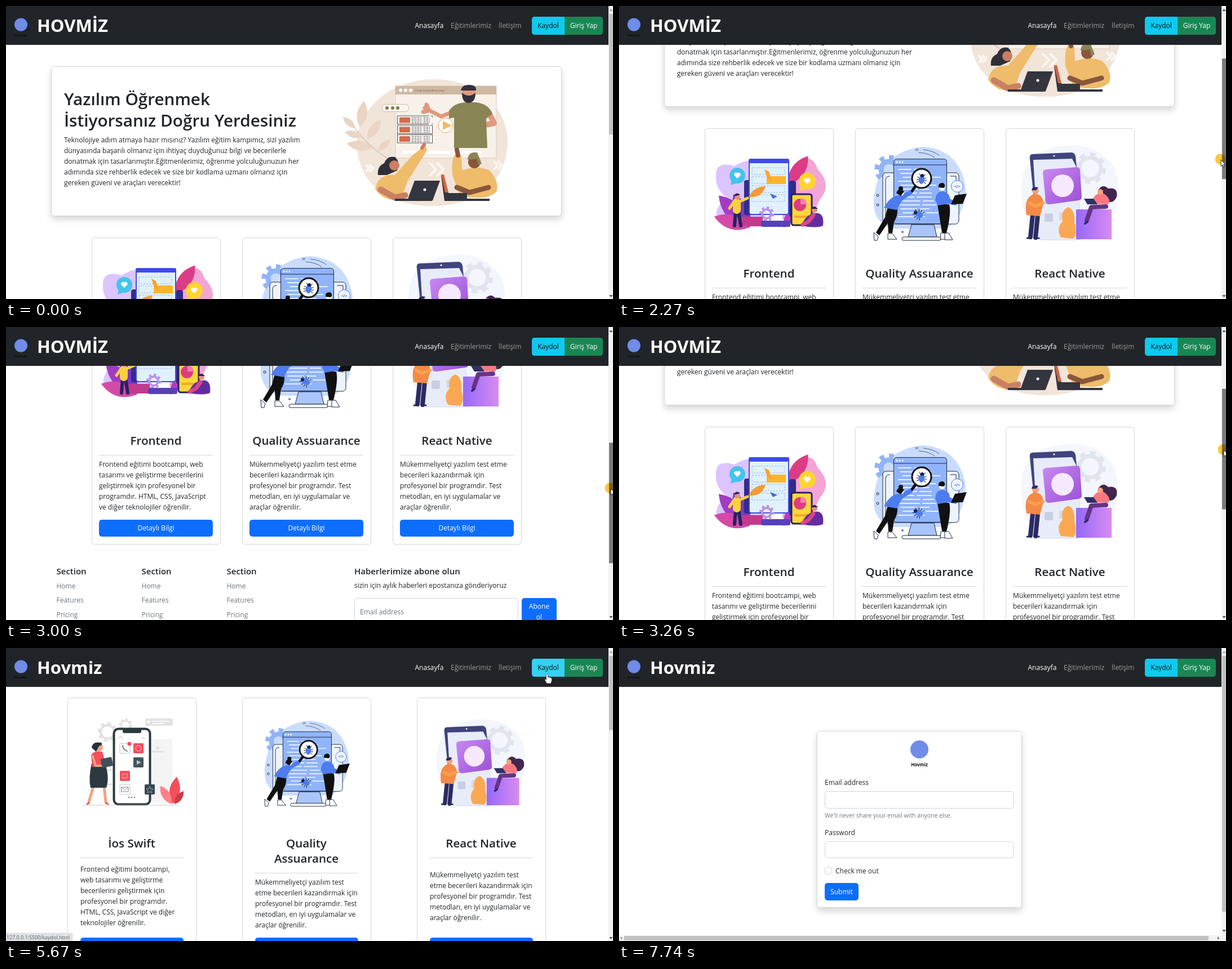
Write an HTML page that moves like this. It is 1077x520 px and loops after 8270 ms.

```html
<!DOCTYPE html>
<html lang="tr">
<head>
<meta charset="utf-8">
<title>Hovmiz</title>
<style>
html, body { margin: 0; width: 100%; height: 100%; overflow: hidden; background: #fff; }
svg { display: block; width: 1077px; height: 520px; font-family: "Open Sans", "Noto Sans", sans-serif; }
.card { fill: #fff; stroke: #d3d4d5; }
.shadow { filter: drop-shadow(0 6px 6px rgba(0, 0, 0, .16)); }
.input { fill: #fff; stroke: #ced4da; }
#halo { mix-blend-mode: multiply; }
</style>
</head>
<body>
<svg id="stage" viewBox="0 0 1077 520"></svg>
<script>
const INK = '#212529', BLUE = '#0d6efd', GREY = '#6c757d', MARK = '#6f8ce8';
const LOOP = 8270, STEP = 66.7;

// Drawing helpers
const rect = (x, y, w, h, fill, rx = 0, more = '') =>
  `<rect x="${x}" y="${y}" width="${w}" height="${h}" rx="${rx}" fill="${fill}" ${more}/>`;
const dot = (x, y, r, fill, more = '') => `<circle cx="${x}" cy="${y}" r="${r}" fill="${fill}" ${more}/>`;
const path = (d, fill, more = '') => `<path d="${d}" fill="${fill}" ${more}/>`;
const line = (d, stroke, width = 1, more = '') =>
  `<path d="${d}" fill="none" stroke="${stroke}" stroke-width="${width}" stroke-linecap="round" stroke-linejoin="round" ${more}/>`;
const text = (x, mid, str, size = 12, fill = INK, more = '') =>
  `<text x="${x}" y="${mid + size * .36}" font-size="${size}" fill="${fill}" ${more}>${str}</text>`;
const semi = 'font-weight="600"', bold = 'font-weight="700"', center = 'text-anchor="middle"';
const lines = (x, y, list) => list.map((s, i) => text(x, y + i * 19, s)).join('');
const leaf = (x, y, len, angle, fill) =>
  path(`M0 0Q${len / 2} ${-len * .38} ${len} 0Q${len / 2} ${len * .38} 0 0Z`, fill, `transform="translate(${x} ${y}) rotate(${angle})"`);
const gear = (x, y, r, color, w = 5) =>
  dot(x, y, r, 'none', `stroke="${color}" stroke-width="${w}"`) +
  dot(x, y, r + w * .8, 'none', `stroke="${color}" stroke-width="${w}" pathLength="16" stroke-dasharray="1"`);
const chevrons = (x, y, h) =>
  [0, h * .6].map(d => line(`M${x + d} ${y - h / 2}l${h / 2} ${h / 2}l${-h / 2} ${h / 2}`, '#fbf6f1', 4)).join('');
const heart = (x, y) => path(`M${x} ${y + 5}l-5 -5a3 3 0 0 1 5 -4a3 3 0 0 1 5 4Z`, '#fff');
const bug = (x, y, a) => `<g transform="translate(${x} ${y}) rotate(${a})">` +
  line('M-8 -4L8 6M-8 6L8 -4M-9 1H9M-3 -6l-2 -4M3 -6l2 -4', '#18223c') +
  `<ellipse rx="5" ry="8" fill="#4d7cf0"/>` + dot(0, -7, 3, '#18223c') + '</g>';

function heroArt() {
  const skin = '#e0997c', olive = '#8a8555', sun = '#eebc6a', dark = '#33353f', brown = '#8a563b';
  const row = y => rect(694.5, y, 62, 14.5, '#fff', 0, 'stroke="#57504c"') + rect(698, y + 2.5, 19, 10, '#d66a4c') +
    [3, 6, 9, 12].map(d => line(`M720 ${y + d}H737M741 ${y + d}H752`, '#8d8682', 1.4, 'stroke-dasharray="3 2"')).join('');
  return path('M624 262C612 190 680 128 762 130C842 132 892 184 890 244C888 310 836 357 752 355C680 353 634 320 624 262Z', '#f1e4d9') +
    line('M676 270Q636 244 615 210', '#dcc6b4', 1.5) +
    [[620, 217, 30, 222], [628, 216, 48, 279], [632, 232, 32, 196], [641, 236, 42, 305], [650, 252, 46, 190], [660, 257, 30, 318]]
      .map(l => leaf(...l, '#ead5c5')).join('') +
    rect(691, 142, 179, 128, '#f8f1ea', 0, 'stroke="#ddcbbb"') + rect(691, 142, 179, 15, '#cfb8a2') +
    [700, 709, 718].map(x => dot(x, 149.5, 3, '#fff')).join('') + text(725, 150, 'Örnek Online Bootcamp', 4.7, '#75695f') +
    rect(703, 257, 141, 5, '#fff') + rect(667, 174.5, 48, 13, '#fbf6f1', 6.5, 'stroke="#cfb8a2"') +
    [676, 686, 695].map(x => dot(x, 181, 3, '#857650')).join('') + [195, 212, 228.5].map(row).join('') +
    chevrons(752, 203, 14) + chevrons(752, 290, 22) + chevrons(639, 288, 11) + chevrons(866, 283, 13) +
    dot(780, 212, 13, '#fff', 'stroke="#e5ad61"') + path('M775 204L791 212L775 220Z', sun) +
    // presenter
    line('M795 187L772 196L743 181M752 185L740 188M750 183L746 175', skin, 7) + line('M856 188L866 208L830 215', skin, 10) +
    path('M786 186Q796 170 822 171Q854 169 863 191L852 200L854 252H795V198L786 200Z', olive) +
    dot(821, 156, 11.5, skin) + path('M809 154Q809 172 821 172Q833 171 833 154Q821 164 809 154Z', '#33303a') +
    path('M807 150Q809 139 822 140Q835 140 834 150Z', '#33303a') +
    // left learner
    path('M660 300Q658 285 671 279Q676 265 690 268Q700 276 694 292L676 300Z', '#302f38') + dot(689, 283, 9, '#c98063') +
    path('M655 325Q660 298 690 300L722 264L744 248L747 256L712 312L702 340Q675 352 655 325Z', sun) +
    line('M738 252l4 -6', '#c98063', 6) + line('M665 326L690 340L708 336', '#c98063', 11) +
    path('M725 310H770L757 345H712Z', dark) + rect(690, 342, 66, 4, dark) + dot(743, 326, 2.5, '#fff') +
    // right learner
    path('M792 300Q790 270 797 264L808 266L809 292Q835 282 858 292Q876 312 870 330Q850 348 805 335Z', sun) +
    line('M802 265L800 255', brown, 8) + dot(831, 277, 11, brown) + path('M819 273Q820 258 836 260L844 280L838 282L835 271Z', olive) +
    line('M856 322L822 331L800 322', brown, 9) + path('M772 301L777 301L785 332H818V346H778Z', dark) +
    path('M772 299L777 299L785 331L779 331Z', '#cf6649') + rect(780, 342, 78, 4, dark);
}

function frontendArt() {
  const navy = '#26225f';
  return path('M172 300Q172 276 205 285Q228 270 245 278L260 388H185Q158 372 190 340Q170 325 172 300Z', '#dcc5ff') +
    path('M298 300Q340 250 352 290Q380 318 356 345L340 380H290Z', '#f3a5d6') +
    leaf(300, 318, 62, -55, '#dc3c86') + leaf(228, 392, 75, 227, '#a13cc3') + leaf(232, 394, 66, 197, '#d44aa8') + leaf(232, 394, 66, 244, '#7a39c4') +
    leaf(292, 394, 40, 300, '#b33ec4') + rect(222, 310, 18, 62, '#332b88', 4) + rect(231, 273, 70, 98, '#e0f1fd', 4, 'stroke="#3f4ae8" stroke-width="2"') +
    rect(230, 272, 72, 8, '#3f4ae8', 3) + [288, 304, 320, 336].map(y => rect(236, y, 58, 12, 'none', 1, 'stroke="#9ab7df" stroke-dasharray="3 2"')).join('') +
    rect(262, 303, 34, 14, '#fbb52d') + path('M258 291l8 4l6 18l-9 -7Z', '#f7a427') + path('M230 340Q238 322 260 321Q254 342 230 340Z', '#f79a35') +
    line('M228 342L214 350', '#4836b8', 4) + path('M268 334l13 5l-8 4Z', '#4067e8') +
    dot(210, 302, 14, '#44c3ee') + path('M200 310l-2 9l12 -4Z', '#44c3ee') + heart(210, 302) +
    dot(334, 312, 15, '#ffd432') + path('M323 319l-2 10l13 -4Z', '#ffd432') + heart(334, 312) +
    rect(302, 311, 12, 64, '#332b88', 4) + rect(306, 335, 36, 55, '#ffd73b', 4, `stroke="${navy}" stroke-width="3"`) + dot(321, 354, 11, '#df3b83') +
    path('M322 353V342A11 11 0 0 1 333 353Z', '#f47eb0') + rect(311, 373, 24, 4, '#f6a531') + gear(262, 370, 8, '#b794e8', 4) +
    rect(216, 375, 39, 17, '#c33a8c', 2) + rect(252, 382, 52, 11, '#5840ba', 3) +
    line('M207 365L205 391M212 365L216 391', navy, 6) + line('M209 349V363', '#fad13d', 14) + line('M205 347L196 360M214 348L228 342', '#fad13d', 5) +
    dot(210, 340, 5, '#e98f78') + path('M204 339Q207 330 215 336Z', navy) +
    path('M324 391Q330 372 346 369Q365 365 362 391Q350 396 324 391Z', '#632d9e') + line('M345 372L337 383L326 389', '#d8458e', 7) + dot(347, 363, 5, '#e98f78') + path('M341 361Q346 353 353 361Z', navy);
}

function testArt() {
  const navy = '#1c2744', mid = '#4d7cf0';
  return path('M452 345Q460 258 540 251Q606 256 615 325Q612 380 580 396H485Q450 385 452 345Z', '#c9dcfd') + gear(479, 291, 14, '#92b4f7', 9) +
    line('M540 256Q558 258 568 266M532 261Q550 262 560 270M526 254l5 4m0 -4l-5 4', '#4d5f89') +
    rect(468, 297, 135, 91, '#eef4ff', 6, `stroke="${navy}"`) + line('M473 375V310Q473 303 480 303M598 310V303H588', navy) +
    rect(487.5, 272.5, 94, 115, '#90b4fb', 5, `stroke="${navy}"`) + line('M488 283H581', navy) + [493, 498, 503].map(x => dot(x, 278, 1.5, '#fff')).join('') +
    [0, 1, 2, 3, 4, 5, 6, 7, 8, 9, 10, 11, 12].map(i => line(`M${496 + i % 3 * 4} ${291 + i * 7}h${22 + i * 7 % 16}m6 0h${14 + i * 5 % 12}`, '#e5efff', 2)).join('') +
    line('M526 321L517 333', '#111', 5) + dot(537, 307, 17, '#fff', 'stroke="#111" stroke-width="3"') + bug(537, 309, 8) + bug(532, 371, -60) +
    dot(600, 321, 10.5, '#eef4ff', `stroke="${mid}"`) + text(600, 321, '&lt;/&gt;', 7, '#345bbb', `${semi} ${center}`) +
    path('M519 389H559L564 411H513Z', '#a9c5fb', `stroke="${navy}"`) + rect(502, 411, 69, 6, '#fff', 3, `stroke="${navy}"`) +
    dot(459, 337, 2, 'none', `stroke="${navy}"`) + dot(459, 354, 2, 'none', `stroke="${navy}"`) + dot(503, 402, 2, mid) +
    path('M477 357L494 360Q495 374 488 384L485 404H478L477 386L462 408L456 403L472 376Z', '#111') +
    path('M452 403l8 7l-2 7h-5Z', '#fff', `stroke="${navy}"`) + path('M477 405h8l8 10h-16Z', '#fff', `stroke="${navy}"`) +
    path('M470 359Q482 337 498 337L517 328L521 334L502 346L493 363Z', mid) + dot(501, 333, 4.5, '#fff') + path('M492 333Q496 321 506 330L500 338Z', '#111') + dot(500, 325, 4, '#111') +
    path('M565 353H586Q590 368 581 404H574L575 376L580 403H573Z', '#111') + path('M571 404h8v11h-9Z', '#fff', `stroke="${navy}"`) + path('M578 404h7l7 12h-14Z', '#fff', `stroke="${navy}"`) +
    path('M561 346Q562 331 573 330Q586 331 587 343L601 350L598 355L584 352L566 355Z', mid) + dot(573, 324, 5, '#fff') + path('M567 323Q566 314 575 315Q581 319 576 324Z', '#111') +
    path('M596 337L617 334L610 352L589 353Z', '#111');
}

function mobileArt() {
  const navy = '#2b2b62', peach = '#f2a07e';
  return path('M714 335Q710 262 780 250Q850 240 880 290Q896 350 862 402Q820 424 755 412Q716 390 714 335Z', '#f3f6fc') + gear(836, 289, 19, '#e0e4ec', 7) +
    path('M733 264L803 261Q809 262 810 268L821 408Q821 416 813 416H749Q742 414 741 407L729 272Q728 265 733 264Z', '#e8ecf9', 'stroke="#d5d9ea"') +
    path('M733 264L803 261Q809 262 810 268L812 288L804 272L735 274L743 408L729 272Q728 265 733 264Z', '#40447c') + dot(772, 267, 1.5, '#fff') +
    rect(755, 340, 13, 13, '#ccd2e4', 3) + rect(755, 369, 15, 15, '#c9cfe3', 3) + rect(781, 367, 15, 15, '#d6dbea', 3) +
    path('M758 291L812 287Q818 287 818 293L821 340Q821 345 815 346L764 353Q757 353 757 347L752 297Q752 292 758 291Z', 'url(#violet)') + dot(787, 320, 20, '#f6e9ff') +
    path('M784 412Q775 395 787 383Q783 364 797 358Q810 363 808 386Q814 406 806 414Z', '#fba852') +
    rect(811, 362, 63, 53, 'url(#box)') +
    line('M734 372L730 411M743 372L739 412', navy, 8) + path('M723 372Q717 340 738 334Q753 336 753 352L747 374Z', '#f48a45') + line('M728 351L738 356L752 351', '#f9a050', 6) +
    dot(739, 329, 6, peach) + path('M732 328Q733 320 744 323L740 328Z', navy) + line('M730 413h-6M739 413h6', navy, 3) +
    path('M850 328Q858 315 868 325Q886 322 883 340Q875 355 864 345Z', '#42264f') + path('M840 344Q850 328 862 335Q874 345 868 353L845 352Z', '#f9787e') + dot(854, 331, 5, peach) +
    line('M864 357L838 358L830 381', '#673387', 8) + path('M825 343h17l7 10h-18Z', '#303063') + line('M831 384l-4 3', navy, 4);
}

function phoneArt() {
  const dark = '#2b3941', red = '#f2505d', pale = '#e2e2e2';
  const icon = (x, y, fill, glyph) => rect(x - 9, y - 9, 18, 18, fill, 2, fill === '#fff' ? 'stroke="#c2c5c7"' : '') + glyph;
  return gear(180, 149, 12, pale, 4) + gear(212, 137, 8, pale, 3) + gear(262, 222, 9, pale, 4) +
    rect(247, 125, 49, 13, pale) + line('M260 130H290M260 134H280', '#fff', 1.5) + dot(253, 131, 2.5, '#fff') +
    rect(240, 162, 55, 112, '#f4f4f4') + dot(269, 177, 3, pale) + line('M260 184H279M164 217H187M168 242H187', pale, 3) +
    rect(191.5, 143.5, 64, 134, '#fff', 8, `stroke="${dark}" stroke-width="4"`) + rect(207, 143, 33, 8, dark, 3) +
    line('M199 160l4 -3l4 3M242 160h5', '#bbb') +
    icon(211, 178, '#fff', line('M207 173Q207 180 215 183', '#888', 2)) + dot(219, 170, 3.5, red) +
    icon(235, 178, red, dot(235, 178, 5, 'none', 'stroke="#ffb5b8"')) + icon(235, 203, '#45545c', path('M232 199L240 203L232 207Z', '#b8c3c8')) +
    icon(211, 227, red, rect(207, 223, 8, 8, 'none', 1, 'stroke="#ffb5b8"')) + icon(211, 251, '#fff', line('M205 247h12v8h-12ZL211 252L217 247', '#888')) +
    icon(255, 251, '#37474f', line('M255 246l2 4h4l-3 3l1 4l-4 -2l-4 2l1 -4l-3 -3h4Z', '#98a6ad')) + [218, 223, 228].map(x => dot(x, 265, 1, dark)).join('') +
    line('M155 246L147 273M174 246L177 273', '#f3a47f', 5) + path('M152 205H176Q184 230 178 248H150Q146 230 152 205Z', dark) +
    path('M151 190Q156 181 171 184L178 211H153Z', red) + line('M154 192L159 209L178 209', '#f3a47f', 4) + rect(169, 195, 20, 16, '#40515a', 2, 'transform="rotate(-12 179 203)"') +
    dot(165, 176, 7, '#f3a47f') + path('M152 177Q153 165 169 168Q173 172 165 174L160 184Z', '#263238') + line('M147 275l-3 2M177 275l4 2', red, 3) +
    leaf(296, 277, 49, -82, red) + leaf(299, 277, 28, -55, '#c93b49') + leaf(294, 277, 38, 238, '#ff8188') + line('M138 279H306', '#c7c9ca');
}

// Pages
const button = (x, y, w, h, label) => rect(x, y, w, h, BLUE, 5) + text(x + w / 2, y + h / 2, label, 12, '#fff', center);
const card = (x, y, w, h, more = '') => `<rect class="card ${more}" x="${x}" y="${y}" width="${w}" height="${h}" rx="5"/>`;
const input = (x, y, w, h, r = 5) => `<rect class="input" x="${x}" y="${y}" width="${w}" height="${h}" rx="${r}"/>`;
const art = (id, move) => `<use href="#${id}" transform="${move}"/>`;
const webText = ['Frontend eğitimi bootcampi, web', 'tasarımı ve geliştirme becerilerini', 'geliştirmek için profesyonel bir', 'programdır. HTML, CSS, JavaScript', 've diğer teknolojiler öğrenilir.'];
const testText = ['Mükemmeliyetçi yazılım test etme', 'becerileri kazandırmak için', 'profesyonel bir programdır. Test', 'metodları, en iyi uygulamalar ve', 'araçlar öğrenilir.'];
const shortTest = ['Mükemmeliyetçi yazılım test', 'etme becerileri kazandırmak için', ...testText.slice(2)];

const homeCard = (x, title, body, id) => card(x + .5, 411.5, 228, 441) + art(id, 'translate(0 193)') +
  text(x + 114, 669, title, 20.6, INK, `${semi} ${center}`) + rect(x + 13, 694, 202, 1, '#d6d7d8') + lines(x + 13, 711, body) + button(x + 13, 809, 202, 30, 'Detaylı Bilgi');

const home = card(80.5, 107.5, 905, 265, 'shadow') +
  text(103, 165, 'Yazılım Öğrenmek', 29.7, INK, semi) + text(103, 203, 'İstiyorsanız Doğru Yerdesiniz', 29.7, INK, semi) +
  lines(103, 237.5, ['Teknolojiye adım atmaya hazır mısınız? Yazılım eğitim kampımız, sizi yazılım', 'dünyasında başarılı olmanız için ihtiyaç duyduğunuz bilgi ve becerilerle',
    'donatmak için tasarlanmıştır.Eğitmenlerimiz, öğrenme yolculuğunuzun her', 'adımında size rehberlik edecek ve size bir kodlama uzmanı olmanız için', 'gereken güveni ve araçları verecektir!']) +
  heroArt() +
  homeCard(152, 'Frontend', webText, 'web') + homeCard(419, 'Quality Assuarance', testText, 'test') + homeCard(686, 'React Native', testText, 'mobile') +
  [89.5, 240.5, 391.5].map(x => text(x, 901, 'Section', 15, INK, semi) +
    ['Home', 'Features', 'Pricing', 'FAQs', 'About'].map((s, i) => text(x, 926.5 + i * 25.4, s, 12, GREY)).join('')).join('') +
  text(618, 901, 'Haberlerimize abone olun', 15, INK, semi) + text(618, 926, 'sizin için aylık haberleri epostanıza gönderiyoruz') +
  input(618.5, 948.5, 290, 48) + text(628, 973, 'Email address', 12, GREY) + rect(915, 948, 62, 49, BLUE, 5) +
  text(946, 963, 'Abone', 12, '#fff', center) + text(946, 982, 'ol', 12, '#fff', center) +
  rect(80, 1067, 906, 1, '#dee2e6') + text(89.5, 1096, '© 2023 Company, Inc. All rights reserved.');

const courseCard = (x, titles, y, body) => card(x + .5, 88.5, 228, 470) +
  titles.map((s, i) => text(x + 114, 347 + i * 27, s, 20.6, INK, `${semi} ${center}`)).join('') +
  rect(x + 23, 345 + titles.length * 27, 183, 1, '#d6d7d8') + lines(x + 23, y, body) + button(x + 23, 514, 183, 30, 'Detaylı Bilgi');

const courses = courseCard(109, ['İos Swift'], 393, ['Frontend eğitimi bootcampi,', 'web tasarımı ve geliştirme', 'becerilerini geliştirmek için', 'profesyonel bir programdır.', 'HTML, CSS, JavaScript ve diğer', 'teknolojiler öğrenilir.']) +
  courseCard(419, ['Quality', 'Assuarance'], 415.5, shortTest) + courseCard(729, ['React Native'], 402.5, shortTest) +
  phoneArt() + art('test', 'translate(44.8 -101) scale(.916)') + art('mobile', 'translate(110 -101) scale(.916)');

const signup = card(351.5, 147.5, 363, 313, 'shadow') + dot(533, 180, 16, MARK) + text(533, 207, 'Hovmiz', 8, '#111', `${bold} ${center}`) +
  text(365, 239, 'Email address') + input(365.5, 254.5, 335, 30) + text(365, 297, 'We\'ll never share your email with anyone else.', 10.5, GREY) +
  text(365, 327.5, 'Password') + input(365.5, 343.5, 335, 29) + input(365.5, 389.5, 12, 12, 3) + text(384, 395.5, 'Check me out') + button(365, 417, 60, 31, 'Submit') +
  rect(0, 510, 1069, 10, '#f1f1f1') + rect(9, 511, 1037, 8, '#c1c1c1') + path('M2 515l3 -2.5v5Z', '#8a8a8a') + path('M1065 515l-3 -2.5v5Z', '#505050');

const header = rect(0, 0, 1069, 69, INK) + dot(26.5, 33, 11.5, MARK) + text(26, 52, 'Hovmiz', 6, '#0b0c0d', `${bold} ${center}`) +
  text(55, 35, 'HOVMİZ', 31.1, '#fff', `id="brand" ${bold}`) + text(725.5, 35, 'Anasayfa', 12, '#fff') +
  text(789, 35, 'Eğitimlerimiz', 12, '#9b9d9e', 'id="navCourses"') + text(874, 35, 'İletişim', 12, '#9b9d9e', 'id="navContact"') +
  path('M938 19H991V51H938Q933 51 933 46V24Q933 19 938 19Z', '#0dcaf0', 'id="join"') + path('M991 19H1054Q1059 19 1059 24V46Q1059 51 1054 51H991Z', '#198754') +
  text(962, 35, 'Kaydol', 12, '#111', center) + text(1025, 35, 'Giriş Yap', 12, '#fff', center);

document.getElementById('stage').innerHTML = `<defs>
  <linearGradient id="violet" x2="1" y2="1"><stop stop-color="#c98af2"/><stop offset="1" stop-color="#9a4fd6"/></linearGradient>
  <linearGradient id="box" x2="1"><stop stop-color="#9569fa"/><stop offset="1" stop-color="#d78bef"/></linearGradient>
  <g id="web">${frontendArt()}</g><g id="test">${testArt()}</g><g id="mobile">${mobileArt()}</g></defs>
  <g id="home">${home}</g><g id="courses">${courses}</g><g id="signup">${signup}</g>${header}
  ${rect(1069, 0, 8, 520, '#f1f1f1') + rect(1070, 14, 7, 214, '#c1c1c1', 0, 'id="thumb"')}
  ${path('M1070.5 9l3 -4l3 4Z', '#a3a3a3', 'id="up"') + path('M1070.5 513l3 4l3 -4Z', '#505050', 'id="down"')}
  <g id="status">${rect(-4, 505.5, 133, 18, '#dfe1e5', 3, 'id="statusBox"') + text(1, 514, '', 8.9, '#54585c', 'id="statusText"')}</g>
  ${dot(0, 0, 9.5, '#ffe838', 'id="halo"')}
  <g id="cursor">${path('M0 0V11.5L2.7 9L4.6 13L6.4 12.2L4.6 8.3H8.2Z', '#fff', 'id="arrow" stroke="#000" stroke-width=".8"')}
  ${path('M-1.5 1.2Q0 -1 1.5 1.2V6Q3 5 4.2 6.4Q5.6 5.6 6.6 7Q8 6.6 8.4 8V12Q8 14 6.6 17H-.6Q-2 13.5 -4 11Q-4.6 9 -3 9L-1.5 10.5Z', '#fff', 'id="hand" stroke="#222" stroke-width=".7"')}</g>`;

// Motion: [time, value...], linear between entries
const scrollKeys = [[2108, 0], [2669, 680], [2868, 680], [2935, 560], [3001, 468], [3402, 0]];
const cursorKeys = [[0, 1075, 415], [910, 1075, 415], [920, 1077, 167], [1140, 1070, 166], [2108, 1069, 166], [2268, 1068, 273],
  [2669, 1071, 455], [2868, 1073, 455], [3001, 1073, 287], [3402, 1073, 150], [3600, 1073, 150], [4268, 837, 36],
  [5263, 837, 36], [5600, 960, 46], [7215, 960, 46], [7281, 985, 120], [7345, 1033, 285]];
const links = [[4268, 'egitimler', 129], [5400, 'iletisim', 122], [5530, 'kaydol', 118.5], [7610, '', 0]];

function at(keys, t) {
  const i = keys.findIndex(k => k[0] > t);
  if (i < 0) return keys[keys.length - 1].slice(1);
  if (!i) return keys[0].slice(1);
  const a = keys[i - 1], b = keys[i], p = (t - a[0]) / (b[0] - a[0]);
  return a.slice(1).map((v, n) => v + (b[n + 1] - v) * p);
}

const el = {};
document.querySelectorAll('[id]').forEach(e => el[e.id] = e);
const set = (id, attrs) => { for (const k in attrs) el[id].setAttribute(k, attrs[k]); };
const show = (id, on) => { el[id].style.display = on ? '' : 'none'; };
const within = (t, a, b) => t >= a && t < b;

function render(t) {
  const q = Math.floor((t + 6) / STEP) * STEP;
  const page = t < 4810 ? 'home' : t < 6360 ? 'courses' : 'signup';
  const [scroll] = at(scrollKeys, q), [x, y] = at(cursorKeys, q);
  for (const id of ['home', 'courses', 'signup']) show(id, id === page);
  set('home', { transform: `translate(0 ${-Math.round(scroll)})` });
  el.brand.textContent = page === 'home' ? 'HOVMİZ' : 'Hovmiz';

  const pressed = within(t, 1880, 3660), over = within(t, 920, 3660);
  set('thumb', {
    y: 14 + scroll * .409, height: { home: 214, courses: 132, signup: 454 }[page],
    fill: pressed ? '#7b7b7b' : over ? '#b2b2b2' : '#c1c1c1'
  });
  set('up', { fill: scroll > 0 ? '#505050' : '#a3a3a3' });
  set('down', { transform: `translate(0 ${page === 'signup' ? -13 : 0})` });

  const link = links.filter(l => l[0] <= t).pop() || [0, '', 0];
  show('status', link[1]);
  el.statusText.textContent = `127.0.0.1:5500/${link[1]}.html`;
  set('statusBox', { width: link[2] + 4 });

  const hand = within(t, 4268, 7280);
  set('navCourses', { fill: within(t, 4268, 5400) ? '#c8c9ca' : '#9b9d9e' });
  set('navContact', { fill: within(t, 5400, 5530) ? '#c8c9ca' : '#9b9d9e' });
  set('join', { fill: within(t, 5530, 7280) ? '#31d2f2' : '#0dcaf0' });
  show('cursor', within(t, 260, 330) || within(t, 920, 7410));
  show('halo', within(t, 920, 7410) && !hand);
  show('arrow', !hand);
  show('hand', hand);
  set('cursor', { transform: `translate(${x} ${y})` });
  set('halo', { cx: x - 1, cy: y - 1, fill: pressed ? '#ffc63c' : '#ffe838' });
}

function tick() {
  render(performance.now() % LOOP);
  requestAnimationFrame(tick);
}
tick();
</script>
</body>
</html>
```
